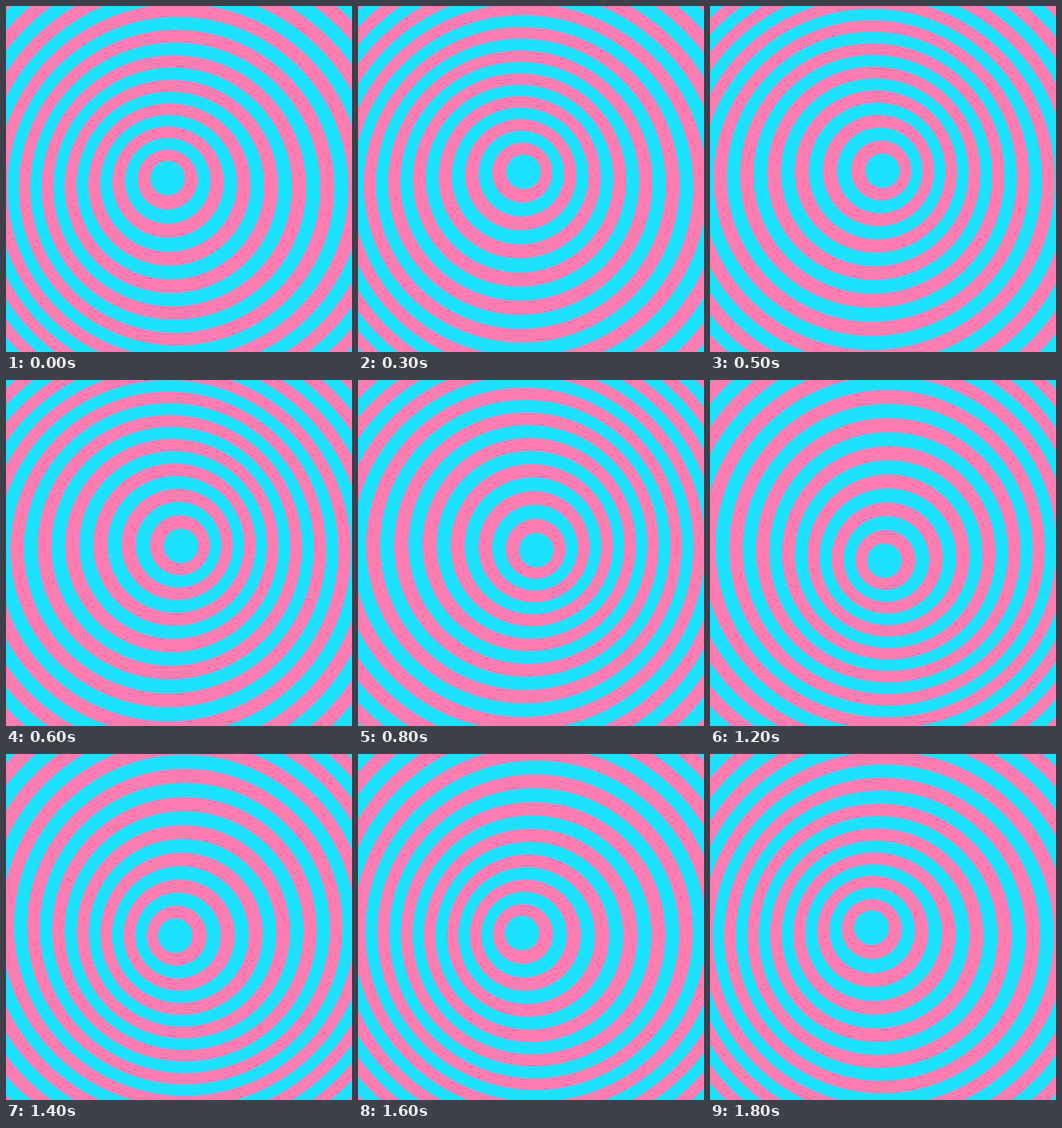
These frames come from a looping animation (480x480 px, 1.9 s). An HTML page:

```html
<!DOCTYPE html>
<html lang="en">
<head>
<meta charset="utf-8">
<title>Swaying rings</title>
<style>
  html, body { margin: 0; width: 100%; height: 100%; overflow: hidden; background: #ff7bb0; }
  svg { display: block; width: 480px; height: 480px; }
</style>
</head>
<body>
<svg id="stage" viewBox="0 0 480 480"></svg>
<script>
const LOOP = 1900, TICKS = 19, RINGS = 22;
const CENTER = { x: 235.5, y: 240.2 }, SWAY = 12;
const INNER = 24, GAP = 17.72, LAG = 9;
const COLORS = ['#1be1ff', '#ff7bb0'];

// [tick, angle of the innermost disc in degrees]
const KEYS = [[0, 186], [3, 237], [5, 285.5], [8, 340], [10, 387], [14, 456], [18, 536], [19, 546]];

function angleAt(tick) {
  const i = KEYS.findIndex(([t]) => t >= tick);
  if (i === 0) return KEYS[0][1];
  const [t0, a0] = KEYS[i - 1], [t1, a1] = KEYS[i];
  return a0 + (a1 - a0) * (tick - t0) / (t1 - t0);
}

// Every ring trails the one inside it by LAG degrees.
function offset(tick, ring) {
  const a = (angleAt(tick) - LAG * ring) * Math.PI / 180;
  return `translate(${(SWAY * Math.cos(a)).toFixed(3)}px, ${(SWAY * Math.sin(a)).toFixed(3)}px)`;
}

const stage = document.getElementById('stage');
for (let ring = RINGS; ring >= 0; ring--) {
  const disc = document.createElementNS(stage.namespaceURI, 'circle');
  disc.setAttribute('cx', CENTER.x);
  disc.setAttribute('cy', CENTER.y);
  disc.setAttribute('r', INNER + GAP * ring);
  disc.setAttribute('fill', COLORS[ring % 2]);
  stage.append(disc);

  const steps = Array.from({ length: TICKS + 1 }, (_, tick) => ({
    offset: tick / TICKS,
    transform: offset(tick, ring),
    easing: 'step-end'
  }));
  disc.animate(steps, { duration: LOOP, iterations: Infinity });
}
</script>
</body>
</html>
```
